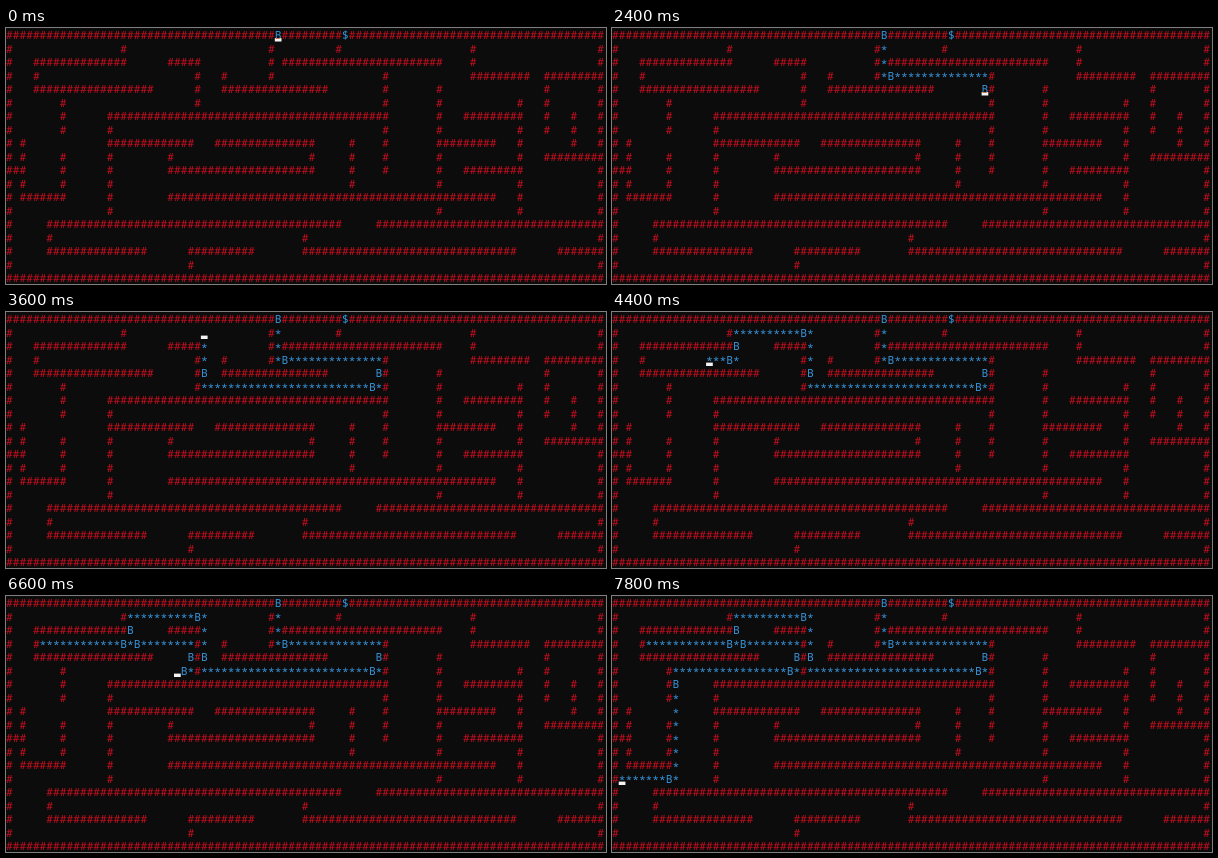
Animation of 600 by 256 pixels, one loop 8000 ms. Source, as an HTML page with a canvas:

```html
<!DOCTYPE html>
<html lang="en">
<head>
<meta charset="utf-8">
<title>Maze search</title>
<style>
  html, body { margin: 0; width: 100%; height: 100%; overflow: hidden; background: #0c0c0c; }
  canvas { display: block; width: 600px; height: 256px; }
</style>
</head>
<body>
<canvas id="stage" width="600" height="256"></canvas>
<script>
const CELL_W = 6.72, CELL_H = 13.5, LOOP = 8000, STEP = 200;
const RED = '#c50f1f', BLUE = '#3a96dd', BG = '#0c0c0c';

// Horizontal walls as "row: first-last", vertical walls as "column: first-last"
const ROWS = `0:0-39,41-49,51-88 2:4-17,24-28,41-64 3:69-77,80-88 4:4-21,32-47
  6:15-56,68-76 8:15-27,31-45,64-72 9:80-88 10:0-2,24-45,68-76 12:2-8,24-72
  14:6-49,55-88 16:6-20,27-36,44-75,82-88 18:0-88`;
const COLS = `0:0-18 2:8-12 4:2-4 6:14-16 8:5-7,9-12 15:6-13 17:1-1 24:9-10
  27:16-17 28:2-5 32:3-4 39:1-3 44:15-16 45:8-10 49:1-1 51:8-11 56:3-10
  64:4-13 69:1-3 76:5-13 80:3-7 84:6-8 88:0-18`;

// Walk from the entrance: direction and length of each leg
const LEGS = 'D3 R15 D2 L26 U4 L11 D2 L13 R13 R9 D2 L18 D8 L8';
const DIRS = { U: [0, -1], D: [0, 1], L: [-1, 0], R: [1, 0] };

// Steps walked at each tick, counted from 1600 ms
const WALK_FROM = 1600;
const WALK = [3, 7, 11, 15, 19, 21, 26, 32, 38, 44, 50, 54, 58, 62, 67, 71,
  76, 77, 79, 81, 84, 86, 89, 94, 99, 102, 107, 112, 117, 122, 128, 134];
const BARE = new Set([50, 102, 122]); // cursor has arrived, mark not yet printed

function eachRun(text, visit) {
  for (const entry of text.trim().split(/\s+/)) {
    const [line, runs] = entry.split(':');
    for (const run of runs.split(',')) {
      const [a, b] = run.split('-').map(Number);
      for (let i = a; i <= b; i++) visit(+line, i);
    }
  }
}

function buildWalls() {
  const cells = new Set();
  eachRun(ROWS, (y, x) => cells.add(x + ',' + y));
  eachRun(COLS, (x, y) => cells.add(x + ',' + y));
  return [...cells].map(c => c.split(',').map(Number));
}

// The first new cell of a leg is a branch point, the rest are trail
function buildPath() {
  let x = 40, y = 0;
  const path = [{ x, y, ch: 'B' }];
  const seen = new Set();
  LEGS.split(' ').forEach((leg, n) => {
    const [dx, dy] = DIRS[leg[0]];
    const len = +leg.slice(1);
    for (let i = 0; i < len; i++) {
      x += dx;
      y += dy;
      const key = x + ',' + y;
      const ch = seen.has(key) ? '' : n && !i ? 'B' : '*';
      seen.add(key);
      path.push({ x, y, ch });
    }
  });
  return path;
}

const ctx = document.getElementById('stage').getContext('2d');
const walls = buildWalls();
const path = buildPath();

function put(ch, x, y, color) {
  ctx.fillStyle = color;
  ctx.fillText(ch, (x + 0.5) * CELL_W, y * CELL_H + (ch === '*' ? 12.8 : 11));
}

function stateAt(t) {
  if (t < 400) return { steps: 0, cursor: path[0] };
  if (t < 800) return { steps: 0, cursor: { x: 41, y: 0 } };
  if (t < WALK_FROM) return { steps: t < 1000 ? 0 : 1, cursor: { x: 88, y: 0 } };
  const steps = WALK[Math.floor((t - WALK_FROM) / STEP)];
  return { steps, cursor: path[steps] };
}

function draw(t) {
  const { steps, cursor } = stateAt(t);
  ctx.globalCompositeOperation = 'source-over';
  ctx.fillStyle = BG;
  ctx.fillRect(0, 0, 600, 256);
  ctx.font = '11.2px "Noto Sans Mono", "DejaVu Sans Mono", monospace';
  ctx.textAlign = 'center';
  ctx.textRendering = 'geometricPrecision';

  for (const [x, y] of walls) put('#', x, y, RED);
  put('$', 50, 0, BLUE);
  const shown = BARE.has(steps) ? steps - 1 : steps;
  for (let i = 0; i <= shown; i++) {
    const { x, y, ch } = path[i];
    if (ch) put(ch, x, y, BLUE);
  }

  // The cursor inverts the bottom quarter of its cell
  ctx.globalCompositeOperation = 'difference';
  ctx.fillStyle = '#fff';
  ctx.fillRect(cursor.x * CELL_W, cursor.y * CELL_H + 10.1, CELL_W, 3.4);
}

const start = performance.now();
function tick() {
  draw((performance.now() - start) % LOOP);
  requestAnimationFrame(tick);
}
tick();
</script>
</body>
</html>
```
